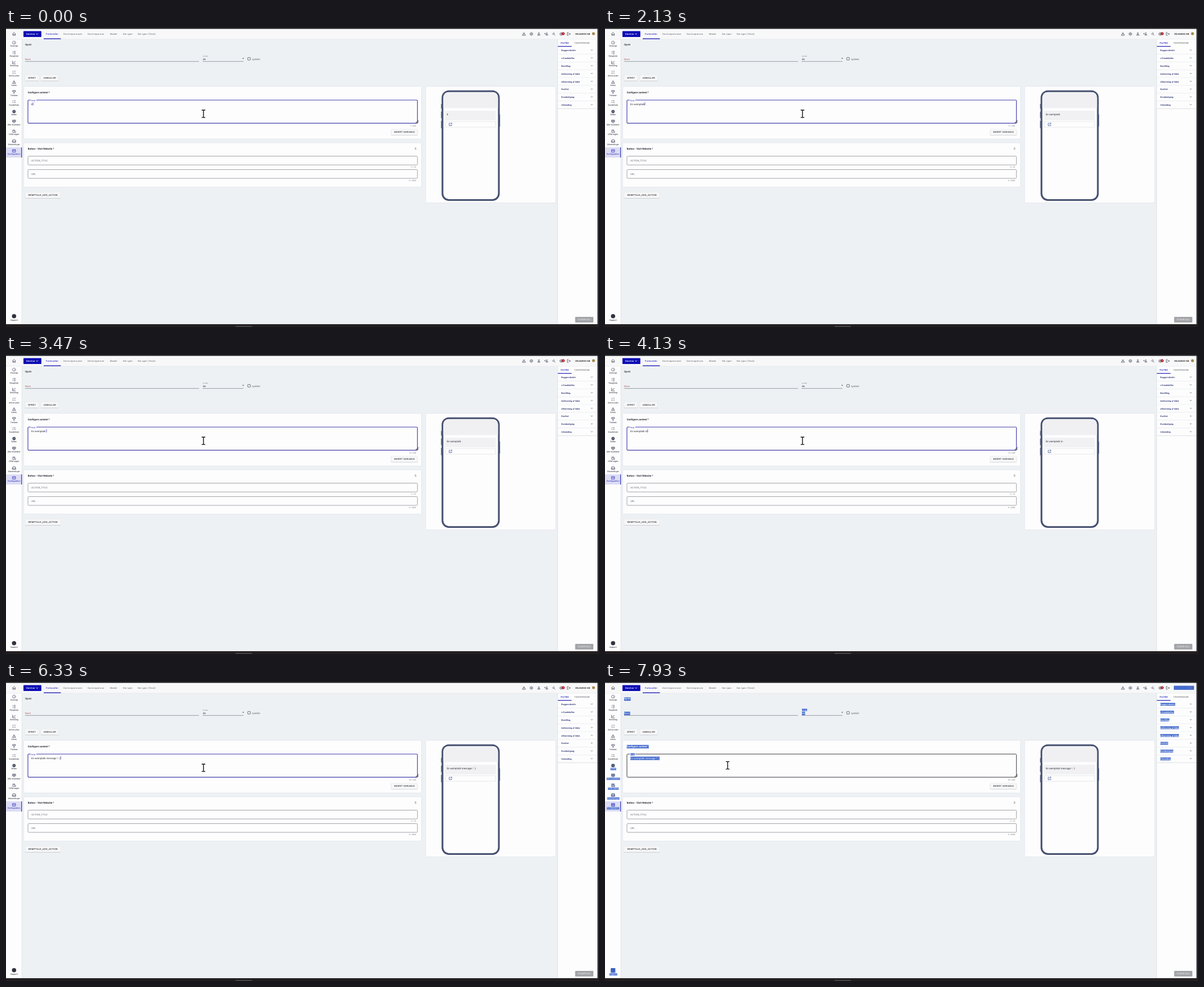
Write an HTML page that moves like this. It is 1054x531 px and loops after 8 s.

```html
<!DOCTYPE html>
<html lang="da">
<head>
<meta charset="utf-8">
<title>Configure content</title>
<style>
html, body { margin: 0; width: 100%; height: 100%; overflow: hidden; background: #edf1f4; }
svg { display: block; width: 1054px; height: 531px; font-family: Roboto, Arial, sans-serif; text-rendering: geometricPrecision; }
text { white-space: pre; }
.hl { fill: #4068cc; visibility: hidden; }
.sel .hl { visibility: visible; }
.sel .pick { fill: #fff; }
.icon { fill: none; stroke: #3b4258; stroke-width: .7; }
</style>
</head>
<body>
<svg id="stage" viewBox="0 0 1054 531"></svg>
<script>
const stage = document.getElementById('stage');
const INK = '#25282e', BLUE = '#2222b8', NAVY = '#232b6b', GREY = '#6c7076';
let out = '';

const rect = (x, y, w, h, fill, more = '') =>
  out += `<rect x="${x}" y="${y}" width="${w}" height="${h}" fill="${fill}" ${more}/>`;
const path = (d, more) => out += `<path d="${d}" ${more}/>`;
const icon = (x, y, d, more = '') => path(d, `class="icon" transform="translate(${x} ${y})" ${more}`);
// y is the middle of the capitals
const text = (x, y, s, size, fill = INK, more = '') =>
  out += `<text x="${x}" y="${(y + size * .355).toFixed(2)}" font-size="${size}" fill="${fill}" ${more}>${s}</text>`;
const mid = 'text-anchor="middle" ', end = 'text-anchor="end" ', bold = 'font-weight="500" ';
const heavy = 'font-weight="700" ', wide = 'letter-spacing=".35" ', pick = 'class="pick" ';
const card = (x, y, w, h) => rect(x, y, w, h, '#fdfdfe', 'stroke="#dfe3e8" stroke-width=".7" rx="1"');
const button = (x, y, w, label) => {
  rect(x, y + .6, w, 10.6, '#c9ccd0', 'rx="1.2"');
  rect(x, y, w, 10.4, '#f7f7f8', 'rx="1.2" stroke="#e2e4e6" stroke-width=".4"');
  text(x + w / 2 + .2, y + 5.2, label, 3.9, INK, mid + bold + wide);
};
const field = (y, label) => {
  rect(39, y, 692.3, 15.6, '#fdfdfe', 'rx="1.6" stroke="#8b8d92" stroke-width=".8"');
  text(45, y + 8, label, 4.4, GREY);
};

const shape = {
  home: 'M-3 .2L0-2.7 3 .2M-2.2-.5V2.6H-.7V.7H.7V2.6H2.2V-.5',
  gauge: 'M-1.8 2.1A2.8 2.8 0 1 1 1.8 2.1ZM0 .6L1.4-1',
  rank: 'M-2.8-2.2H-1.8M-2.8 0H-1.8M-2.8 2.2H-1.8M-.8-2.2H2.8M-.8 0H2.8M-.8 2.2H2.8',
  chart: 'M-2.7-2.8V2.5H2.8M-1.9 1.2L-.5-.8 .8.3 2.6-2.2',
  plan: 'M-2.8-2L-2-1.2-.8-2.6M.4-1.8H2.8M-2.6.8L-1 2.4M-1 .8L-2.6 2.4M.4 1.6H2.8',
  alert: 'M0-2.6L2.9 2.4H-2.9ZM0-.8V.8M0 1.2V1.8',
  cup: 'M-1.5-2.6H1.5V-.6Q0 1.6-1.5-.6ZM-1.5-2H-2.7Q-2.7 0-1.3 0M1.5-2H2.7Q2.7 0 1.3 0M0 .5V2.4M-1.4 2.5H1.4',
  list: 'M-2.9-1.7L-2.2-1-1.2-2.2M-2.9 1.3L-2.2 2-1.2.8M-.2-1.6H2.8M-.2 1.4H2.8',
  disc: 'M-2.1 0A2.1 2.1 0 1 0 2.1 0A2.1 2.1 0 1 0-2.1 0M-.9 0H.9M0-.9V.9',
  desk: 'M-2.8-2.3H2.8V1H-2.8ZM-2.8-.6H2.8M0-2.3V1M-1.5 2.5H1.5',
  rules: 'M-2.3-2.2H1.4V-.4M-2.3-2.2V2.3H0M-1.2-.8H.6M.6 1.4A1.2 1.2 0 1 0 3 1.4A1.2 1.2 0 1 0 .6 1.4',
  send: 'M-2-2.2H2V1.4H-2ZM-3-1V2.4H3V-1',
  config: 'M-2.6-2.2H2.6V2.3H-2.6ZM-2.6-1.6L0 .3 2.6-1.6',
  gear: 'M-1 0A1 1 0 1 0 1 0A1 1 0 1 0-1 0M-2.4-1.2L0-2.6 2.4-1.2V1.2L0 2.6-2.4 1.2Z',
  person: 'M-1.1-1.2A1.1 1.1 0 1 0 1.1-1.2A1.1 1.1 0 1 0-1.1-1.2M-2.3 2.2Q-2.1.8 0 .8T2.3 2.2Z',
  people: 'M-.2-1.2A1 1 0 1 0 1.8-1.2A1 1 0 1 0-.2-1.2M-1 2Q-.8.7 .8.7T3 2ZM-3.4-.6H-1.4M-2.4-1.6V.4',
  tool: 'M-2.4-1.2A1.6 1.6 0 1 0-.9-2.5M-.2 0L2.6 2.7',
  exit: 'M0-2.5H-2.6V2.5H0M-1 0H3M1.6-1.4L3 0 1.6 1.4',
  open: 'M-.4-2.2H-2.3V2.3H2.2V.4M.6-2.4H2.4V-.6M2.4-2.4L-.6.6'
};

// Page frame
rect(0, 0, 1054, 531, '#edf1f4');
rect(0, 0, 1054, 20, '#f8f8f9');
rect(0, 20, 28.3, 506, '#fdfdfe');
rect(980.5, 20, 71, 506, '#fdfdfe');
path('M980.5 20V526M980.5 143.2H1051M28.3 20V526', 'stroke="#d9dde2" stroke-width=".7" fill="none"');
path('M0 20H1051', 'stroke="#e3e5e8" stroke-width=".6"');

// Header
icon(14.3, 10.5, shape.home);
rect(31, 5.6, 31.8, 10.5, '#0d0db4', 'rx=".8"');
text(36, 10.8, 'Service', 3.9, '#fff', heavy + wide);
path('M53.5 9.8L55.2 11.5 56.9 9.8', 'fill="none" stroke="#fff" stroke-width=".9"');
[[71, 'Forhandler'], [102, 'Servicepersoner'], [145, 'Serviceperson'], [185, 'Model'], [208, 'Om igen'], [234, 'Om igen (Total)']]
  .forEach(([x, s], i) => text(x, 11, s, 3.9, i ? GREY : BLUE, bold + wide));
rect(67, 18.4, 30.5, 1.4, BLUE);
['alert', 'gear', 'person', 'people', 'tool', 'gear', 'exit']
  .forEach((n, i) => icon(920.5 + i * 13.28, 10.6, shape[n]));
out += '<circle cx="990.3" cy="10" r="2.6" fill="#b3131c"/>';
text(990.3, 10, '4', 3, '#fff', mid + heavy);
text(1011.5, 10.3, 'VELMARDO-NB', 3.8, '#333', heavy + pick);
out += '<circle cx="1044.2" cy="10" r="2.6" fill="#a8874a"/>';
rect(1011, 6.6, 36, 7.4, '#4068cc', 'class="hl" opacity=".9"');

// Sidebar
rect(0, 212, 28, 18, '#dcdcf4');
rect(27.2, 212, 1.1, 18, BLUE);
const items = 'gauge Oversigt,rank Rangliste,chart Udvikling,plan Action plan,alert Alerts,cup Trofæer,list Kundeliste,disc Bilder,desk Alle resultater,rules CEM regler,send Udsendinger,config Konfiguration';
items.split(',').forEach((item, i) => {
  const cut = item.indexOf(' '), name = item.slice(0, cut), y = 26.2 + i * 17.45, picked = i > 6;
  if (picked) rect(10.9, y - 3, 6.8, 6, '', 'class="hl" opacity=".35"');
  icon(14.3, y, shape[name], name == 'disc' ? 'style="stroke-width:1.5"' : i == 11 ? `style="stroke:${BLUE}"` : '');
  text(14.3, y + 5.8, item.slice(cut + 1), 3.75, i == 11 ? BLUE : INK, mid + (picked ? pick : ''));
});
out += '<circle cx="14.3" cy="511.8" r="3.8" fill="#30343f"/>';
rect(10.2, 508, 8.2, 8.4, '', 'class="hl" opacity=".9"');
text(14.3, 518.8, 'Support', 3.75, INK, mid + pick);

// Top form
text(34, 29.7, 'Opret', 4.5, INK, bold + pick);
text(34, 55.2, 'Navn', 4.45, '#b06060', pick);
path('M34 59.4H343M349.5 59.4H422', 'stroke="#85888d" stroke-width=".8"');
text(350, 49.5, 'Locale', 3, GREY, pick);
text(350, 55.2, 'de', 4.45, INK, pick);
path('M420 53.3H423.2L421.6 55Z', 'fill="#555"');
rect(429.7, 52.4, 4.6, 4.6, 'none', 'rx=".6" stroke="#555" stroke-width=".8"');
text(437.3, 55.2, 'system', 4.45, '#55585e');
button(34, 83.2, 24, 'OPRET');
button(62, 83.2, 31.5, 'ANNULLER');

// Content card
card(31.5, 103.7, 707, 93.3);
text(38.7, 114.2, 'Configure content *', 4.47, INK, heavy + pick);
rect(39, 128, 692.3, 41.1, '#fdfdfe', 'id="area" rx="1.6"');
rect(44, 126.5, 10, 3, '#fdfdfe');
text(45, 128.4, 'Body', 3.3, BLUE, 'id="label" ' + pick);
text(45, 135, '', 4.45, INK, 'id="typed" ' + pick);
path('M728 169L733.4 163.6M730.6 169L733.4 166.2', 'stroke="#222" stroke-width=".9"');
text(728.6, 173.8, '', 3.3, GREY, 'id="count" ' + end);
button(684.5, 179.6, 47.2, 'INSERT VARIABLE');

// Action card
card(31.5, 204, 707, 78.5);
text(38.7, 214.2, 'Button - Visit Website *', 4.47, INK, heavy);
path('M726.8 212.7H729M727 213.6H728.8V215.8H727Z', 'stroke="#777" stroke-width=".5" fill="none"');
field(227.6, 'ACTION_TITLE');
field(251.4, 'URL');
text(728.6, 247.3, '0 / 20', 3.3, '#84836a', end);
text(728.6, 271, '0 / 2000', 3.3, GREY, end);
button(34, 291.7, 63, 'WEMPTALK_ADD_ACTION');

// Phone preview
card(746, 103.7, 231, 206.8);
path('M773.8 135V143M773.8 148.5V160M773.8 165V178M877.6 153.5V175', 'stroke="#465070" stroke-width="1.1"');
rect(775.8, 112.3, 100.2, 193.2, '#fdfdfe', 'rx="11.5" stroke="#465070" stroke-width="3.1"');
path('M777.4 142.3V123.8Q777.4 113.9 787.3 113.9H864.5Q874.4 113.9 874.4 123.8V142.3Z', 'fill="#f0f0f3"');
rect(780.5, 147, 90, 17, '#f1f1f4', 'rx="1"');
text(783.4, 153.2, '', 4.45, INK, 'id="preview"');
rect(780.8, 166.2, 89.5, 10, '#fdfdfe', 'rx=".8" stroke="#dcdfe4" stroke-width=".7"');
icon(790, 171.2, shape.open, 'style="stroke:#34508a"');

// Filter panel
text(986, 26.5, 'FILTRE', 3.9, BLUE, heavy + wide);
text(1010, 26.5, 'TIDSPERIODE', 3.9, GREY, bold + wide);
rect(980.8, 32, 24.5, 1.2, BLUE);
'Baggrundsinfo,● Kundeløfter,Bestilling,Indlevering af bilen,Afhentning af bilen,Kvalitet,Kundeafgang,Udsending'.split(',').forEach((s, i) => {
  const y = 39.5 + i * 13.86;
  text(987, y + .2, s, 3.9, NAVY, bold + pick);
  icon(1041.2, y - .4, 'M-1.5-.7L0 .8 1.5-.7');
  path(`M981 ${y + 6.9}H1051`, 'stroke="#e1e4e8" stroke-width=".6"');
});
rect(1011.6, 513, 32.4, 10, '#a3a5a8', 'rx="1"');
text(1028, 518, 'CLEAR ALL', 3.9, '#f2f2f2', mid + bold + wide);

// Screen edges
rect(1051.3, 0, 2.7, 531, '#2b2d33');
rect(0, 0, 1054, 1.5, '#17181b');
rect(0, 526, 1054, 5, '#231f20');
rect(408, 529.2, 29, 1.8, '#4b4748');

// Caret and pointers
out += `<rect id="caret" y="132" width=".7" height="5.6" fill="${BLUE}"/>
<g id="beam" fill="none"><path d="M-3.2-6.6H-1Q0-6.6 0-5.6Q0-6.6 1-6.6H3.2M0-5.6V5.6M-3.2 6.6H-1Q0 6.6 0 5.6Q0 6.6 1 6.6H3.2" stroke="#111" stroke-width="1.4"/></g>
<path id="arrow" d="M0 0V12.4L2.9 9.7 5.1 14.6 7.3 13.6 5.1 8.9H9Z" fill="#fff" stroke="#222" stroke-width="1"/>`;
stage.innerHTML = out;

const $ = id => document.getElementById(id);
const typed = $('typed'), area = $('area');
const full = 'En wemptalk message !! :)';
const keys = [0, 130, 270, 400, 470, 540, 600, 670, 1670, 1870, 2070, 2470, 4070, 4270, 4400, 4530, 4670, 4800, 4930, 5070, 5330, 5600, 5870, 6130, 6330];
const BLUR = 7180, SELECT = 7530;

function addHighlight(el) {
  const b = el.getBBox(), r = document.createElementNS('http://www.w3.org/2000/svg', 'rect');
  const box = { x: b.x, y: b.y, width: b.width, height: b.height, class: 'hl' };
  for (const k in box) r.setAttribute(k, box[k]);
  el.before(r);
}
typed.textContent = full;
document.querySelectorAll('.pick').forEach(addHighlight);

const ease = (t, a, b) => {
  const p = Math.min(1, Math.max(0, (t - a) / (b - a)));
  return p * p * (3 - 2 * p);
};
const show = (el, on) => el.setAttribute('visibility', on ? 'visible' : 'hidden');

function draw(t) {
  const n = keys.filter(k => k <= t).length;
  const now = full.slice(0, n), selected = t >= SELECT;
  const tinted = now.replace('!!', '<tspan fill="#c98442">!!</tspan>');
  typed.innerHTML = selected ? now : tinted;
  $('preview').innerHTML = tinted;
  $('count').textContent = n + ' / 600';
  stage.classList.toggle('sel', selected);

  const caret = $('caret');
  caret.setAttribute('x', 45.2 + typed.getComputedTextLength());
  show(caret, t < BLUR && (t - keys[n - 1]) % 1000 < 500);

  const away = ease(t, 6720, 7120), back = ease(t, 7280, 7700);
  const x = 351 - 64.5 * away - 68.5 * back, y = 152.3 + 21.2 * away - 25.5 * back;
  const inside = y < 169;
  for (const id of ['beam', 'arrow']) {
    $(id).setAttribute('transform', `translate(${x} ${y})`);
    show($(id), inside == (id == 'beam'));
  }
  const focused = t < BLUR;
  area.setAttribute('stroke', focused ? '#3f3ca8' : inside ? '#3a3b40' : '#6d6da0');
  area.setAttribute('stroke-width', focused ? 1.15 : inside ? 1 : .8);
}

let start;
function tick(time) {
  start ??= time;
  draw((time - start) % 8000);
  requestAnimationFrame(tick);
}
draw(0);
requestAnimationFrame(tick);
</script>
</body>
</html>
```
